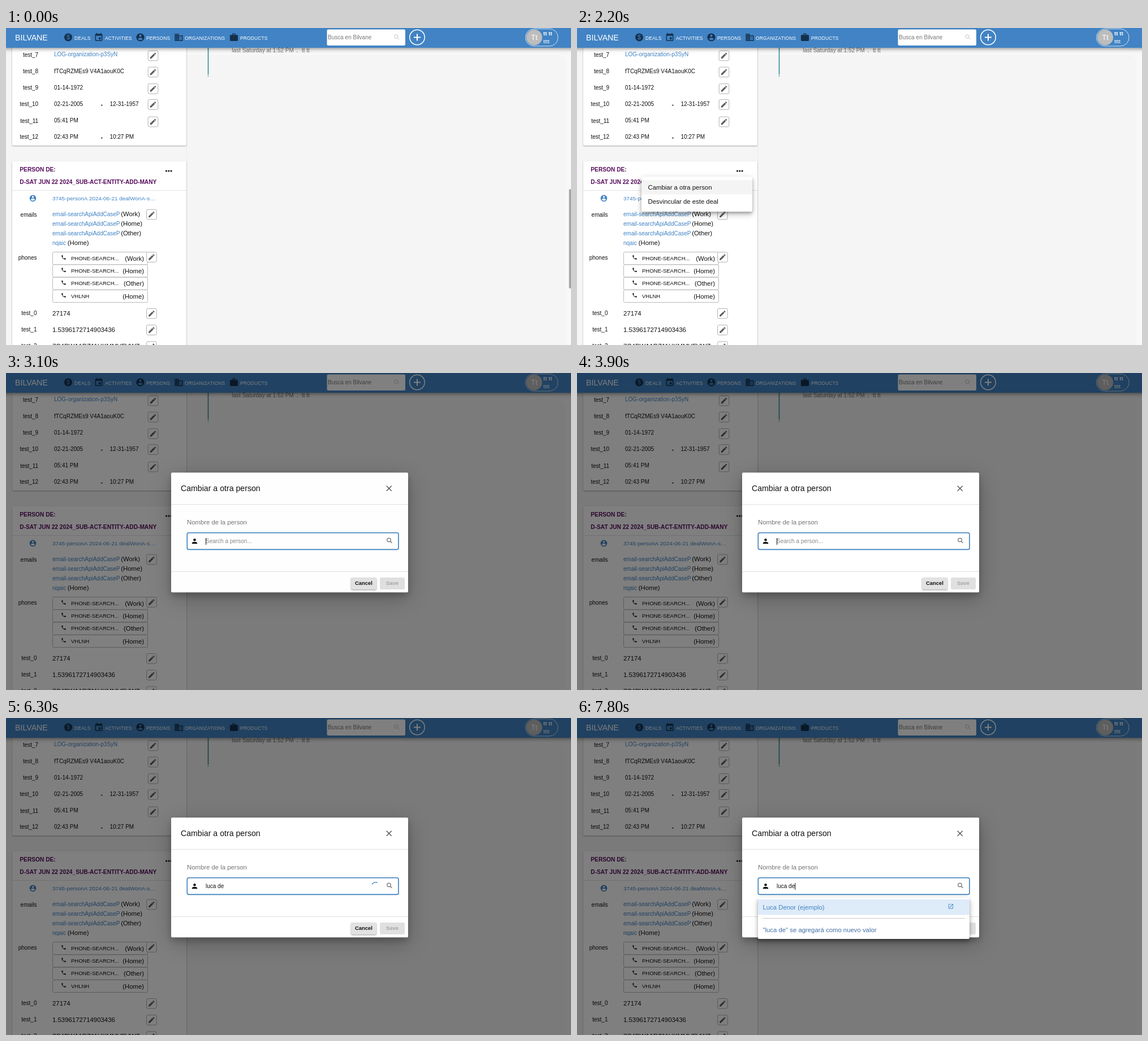
Animation, 999 px wide and 561 px high, one loop 8000 ms. Source, as an HTML page:

```html
<!DOCTYPE html>
<html lang="es">
<head>
<meta charset="utf-8">
<title>Cambiar a otra person</title>
<style>
html, body { margin: 0; width: 100%; height: 100%; overflow: hidden; background: #f5f5f5; }
svg { display: block; width: 100%; height: 100%; font-family: "Liberation Sans", Arial, sans-serif; }
text { white-space: pre; }
.card { filter: drop-shadow(0 1px 1px rgba(0,0,0,.32)); }
.bar { filter: drop-shadow(0 1px 2px rgba(0,0,0,.2)) drop-shadow(0 4px 2.5px rgba(0,0,0,.14)) drop-shadow(0 1px 5px rgba(0,0,0,.12)); }
.paper { filter: drop-shadow(0 3px 2px rgba(0,0,0,.2)) drop-shadow(0 5px 5px rgba(0,0,0,.14)) drop-shadow(0 2px 6px rgba(0,0,0,.12)); }
.sheet { filter: drop-shadow(0 6px 6px rgba(0,0,0,.2)) drop-shadow(0 9px 18px rgba(0,0,0,.24)); }
.button { filter: drop-shadow(0 1px 1px rgba(0,0,0,.4)); }
</style>
</head>
<body>
<svg id="stage" viewBox="0 0 999 561" preserveAspectRatio="none"></svg>
<script>
const BLUE = '#4183c4', INK = '#111', NAVY = '#14304c', PURPLE = '#560a5c';
const BRAND = 'Bilvane', USER = 'tt tt', PERSON = 'Luca Denor', QUERY = 'luca de';
const LOOP = 8000, FRAME = 100;

const ICONS = {
  pencil: 'M3 17.25V21h3.75L17.81 9.94l-3.75-3.75zM20.71 7.04c.39-.39.39-1.02 0-1.41l-2.34-2.34c-.39-.39-1.02-.39-1.41 0l-1.83 1.83 3.75 3.75z',
  account: 'M12 2a10 10 0 1 0 0 20 10 10 0 0 0 0-20zm0 3a3 3 0 1 1 0 6 3 3 0 0 1 0-6zm0 14.2c-2.5 0-4.7-1.3-6-3.2 0-2 4-3.1 6-3.1s6 1.1 6 3.1c-1.3 1.9-3.5 3.2-6 3.2z',
  event: 'M17 12h-5v5h5zM16 1v2H8V1H6v2H5a2 2 0 0 0-2 2v14a2 2 0 0 0 2 2h14a2 2 0 0 0 2-2V5a2 2 0 0 0-2-2h-1V1zm3 18H5V8h14z',
  work: 'M20 6h-4V4a2 2 0 0 0-2-2h-4a2 2 0 0 0-2 2v2H4a2 2 0 0 0-2 2v11a2 2 0 0 0 2 2h16a2 2 0 0 0 2-2V8a2 2 0 0 0-2-2zm-6 0h-4V4h4z',
  phone: 'M6.6 10.8c1.4 2.8 3.8 5.1 6.6 6.6l2.2-2.2c.3-.3.7-.4 1-.2 1.1.4 2.3.6 3.6.6a1 1 0 0 1 1 1V20a1 1 0 0 1-1 1A17 17 0 0 1 3 4a1 1 0 0 1 1-1h3.5a1 1 0 0 1 1 1c0 1.3.2 2.5.6 3.6.1.3 0 .7-.3 1z',
  person: 'M12 12a4 4 0 1 0 0-8 4 4 0 0 0 0 8zm0 2c-2.7 0-8 1.3-8 4v2h16v-2c0-2.7-5.3-4-8-4z',
  open: 'M19 19H5V5h7V3H5a2 2 0 0 0-2 2v14a2 2 0 0 0 2 2h14a2 2 0 0 0 2-2v-7h-2zM14 3v2h3.6l-9.8 9.8 1.4 1.4L19 6.4V10h2V3z'
};

const text = (x, y, s, size = 10, fill = INK, extra = '') =>
  `<text x="${x}" y="${y}" font-size="${size}" fill="${fill}" ${extra}>${s}</text>`;
const END = 'text-anchor="end"', MID = 'text-anchor="middle"', BOLD = 'font-weight="bold"';
const rect = (x, y, w, h, fill, extra = '') =>
  `<rect x="${x}" y="${y}" width="${w}" height="${h}" fill="${fill}" ${extra}/>`;
const line = (d, stroke, w = 1, extra = '') =>
  `<path d="${d}" fill="none" stroke="${stroke}" stroke-width="${w}" ${extra}/>`;
const circle = (x, y, r, fill, extra = '') =>
  `<circle cx="${x}" cy="${y}" r="${r}" fill="${fill}" ${extra}/>`;
const place = (cx, cy, size, body) =>
  `<g transform="translate(${cx - size / 2} ${cy - size / 2}) scale(${size / 24})">${body}</g>`;
const icon = (name, cx, cy, size, fill) =>
  place(cx, cy, size, `<path d="${ICONS[name]}" fill="${fill}" fill-rule="evenodd"/>`);
const lens = (cx, cy, color, w) =>
  circle(cx - 1, cy - 1, 3.2, 'none', `stroke="${color}" stroke-width="${w}"`) +
  line(`M${cx + 1.4} ${cy + 1.4}l3 3`, color, w);
const editButton = (cx, cy) =>
  rect(cx - 8.8, cy - 8.8, 17.6, 17.6, '#fff', 'rx="2.5" stroke="#b0b0b0"') + icon('pencil', cx, cy, 14, '#5c5c5c');

function building(cx, cy) {
  return place(cx, cy, 17,
    `<path d="M2 3h10v4h10v14H2z" fill="${NAVY}"/><path d="M12 9h8v10h-8z" fill="${BLUE}"/>` +
    line('M5 5v14M9 5v14', BLUE, 2, 'stroke-dasharray="2 2"') +
    line('M13 11v8M17 11v6', NAVY, 2, 'stroke-dasharray="2 2"'));
}

function header() {
  const items = [['DEALS', 121], ['ACTIVITIES', 175], ['PERSONS', 248], ['ORGANIZATIONS', 316], ['PRODUCTS', 414]];
  return rect(-20, -20, 1039, 55, BLUE, 'class="bar"') +
    text(16, 22, BRAND.toUpperCase(), 14.2, '#fff') +
    circle(110, 16.5, 7, NAVY) + text(110, 20.4, '$', 11, BLUE, MID) +
    icon('event', 164, 16.5, 17, NAVY) + icon('account', 237.5, 16.5, 17, NAVY) +
    building(305.5, 16.5) + icon('work', 403, 16.5, 17, NAVY) +
    items.map(([s, x]) => text(x, 20.5, s, 8.4, '#fff', 'letter-spacing=".2"')).join('') +
    rect(567.5, 2.5, 138.5, 28.5, '#fff', 'rx="2.5"') +
    text(569, 20.3, 'Busca en ' + BRAND, 10, '#777') + lens(691, 16, '#c4c4c4', 1) +
    circle(727, 16.5, 13.3, 'none', 'stroke="#fff" stroke-width="1.5"') +
    line('M721 16.5h12M727 10.5v12', '#fff', 2) +
    rect(918.5, 1.5, 57.5, 30.5, 'none', 'rx="15" stroke="#d5e3f1"') +
    circle(934, 16.7, 14, '#bdbdbd') + text(934, 21.3, 'Tt', 13, '#fff', MID) +
    text(950, 13.2, USER, 9.8, '#fff', BOLD) + text(950, 27, 'tttt', 9.8, '#fff');
}

function upperCard() {
  const rows = [
    [50.3, 'LOG-organization-p3SyN', '', 49], [79.5, 'fTCqRZMEs9 V4A1aouK0C', '', 78],
    [108.8, '01-14-1972', '', 107.5], [137.5, '02-21-2005', '12-31-1957', 135.5],
    [167.3, '05:41 PM', '', 166], [196.2, '02:43 PM', '10:27 PM', 0]];
  return rect(11, 0, 308, 208, '#fff', 'rx="2" class="card"') + rows.map(([y, a, b, edit], i) =>
    text(57.2, y + .2, 'test_' + (i + 7), 10, INK, END) + text(85, y, a, 10, i ? INK : BLUE) +
    (b && text(167.5, y + 1, '-', 11, INK, BOLD) + text(183.4, y, b)) +
    (edit ? editButton(260, edit) : '')).join('');
}

function lowerCard() {
  const kinds = ['(Work)', '(Home)', '(Other)', '(Home)'];
  const labels = [['emails', 334], ['phones', 409.7], ['test_0', 507.6], ['test_1', 536.8], ['test_2', 566]];
  const values = ['27174', '1.5396172714903436', '7C4BWA1RZ11HKMMVFVWZ'];
  return rect(11, 236, 308, 340, '#fff', 'rx="2" class="card"') +
    text(24.3, 254, 'PERSON DE:', 10.2, PURPLE, BOLD) +
    text(24.3, 276, 'D-SAT JUN 22 2024_SUB-ACT-ENTITY-ADD-MANY', 10.2, PURPLE, BOLD) +
    [283.5, 287.8, 292.1].map(x => circle(x, 253, 1.6, INK)).join('') +
    line('M11 287.5H319', '#e2e2e2') +
    icon('account', 47.5, 301.3, 14, BLUE) +
    text(82, 305.2, '3745-personA 2024-06-21 dealWonA-s…', 9.95, BLUE) +
    labels.map(([s, y]) => text(54.5, y, s, 10, INK, END)).join('') +
    kinds.map((kind, i) => {
      const y = 333.3 + i * 16.8, top = 396.5 + i * 22.35, last = i === 3;
      return text(82, y, last ? 'nqaic' : 'email-searchApiAddCaseP', 10, BLUE) +
        text(last ? 108.8 : 203.2, y, kind, 11.35) +
        rect(82.5, top, 168, 22, '#fff', 'rx="2" stroke="#b8b8b8"') +
        icon('phone', 102, top + 9.5, 10, INK) +
        text(115, top + 14.2, last ? 'VHLNH' : 'PHONE-SEARCH...', 9.5) +
        text(244, top + 15, kind, 11.35, INK, END);
    }).join('') +
    values.map((s, i) => text(82, 508.7 + i * 29.2, s, 11.4)).join('') +
    [330, 405.5, 505.3, 534.5, 563.7].map(y => editButton(257.4, y)).join('');
}

function page() {
  return rect(0, 0, 999, 561, '#f5f5f5') + rect(320, 35, 679, 526, '#f8f8f8') +
    `<path d="M320 48H977a12 12 0 0 1 12 12V561H320z" fill="#f5f5f5"/>` +
    line('M319.5 35V561', '#ececec') +
    line('M357.5 35V82.5', '#2f8d98', 1.6) + circle(357.5, 85, .9, '#2f8d98') +
    text(399.3, 43, 'last Saturday at 1:52 PM', 10, '#777') +
    text(513.5, 43, '.', 11, '#555') + text(523, 43, USER, 10, '#777') +
    upperCard() + lowerCard() + header() +
    rect(995.5, 285, 3.5, 176, '#a3a3a3', 'rx="1.7" id="scrollbar"');
}

function menu() {
  return rect(114, 263, 196, 62, '#fff', 'rx="2" class="paper"') + rect(114, 269, 196, 25.5, '#f4f4f4') +
    text(125.6, 286, 'Cambiar a otra person', 11.35) + text(125.6, 311, 'Desvincular de este deal', 11.35);
}

function dialog() {
  return rect(292, 176.3, 419, 212, '#fff', 'rx="2" class="sheet"') +
    text(309, 209, 'Cambiar a otra person', 14.15) +
    line('M672.7 199.7l9 9m0-9l-9 9', '#555', 1.4) +
    line('M292 232.5H711M292 351.5H711', '#e0e0e0') +
    text(320, 267.5, 'Nombre de la person', 11.35, '#757575') +
    rect(320.3, 282.8, 373.7, 29.6, '#fff', 'rx="3" stroke="#3a7ebd" stroke-width="1.6"') +
    icon('person', 333.5, 297.6, 14, INK) + lens(678, 296.5, '#555', 1.1) +
    rect(610, 362, 45, 21, '#e2e2e2', 'rx="2.5" class="button"') +
    text(632.4, 375.2, 'Cancel', 9.45, INK, `${BOLD} ${MID}`) +
    rect(661, 362, 44, 21, '#e0e0e0', 'rx="2.5"') +
    text(683, 375.2, 'Save', 9.45, '#a6a6a6', `${BOLD} ${MID}`) +
    text(353, 301.2, '', 10, INK, 'id="query"') +
    rect(353, 292, 1, 12, INK, 'id="caret"') +
    `<g id="spinner">${circle(0, 0, 20.2, 'none', 'id="arc" stroke="#3a7ebd" stroke-width="3.6"')}</g>`;
}

function results() {
  return rect(320, 318, 374, 73, '#fff', 'rx="2" class="paper"') + rect(320, 321, 374, 27.5, '#deebf9') +
    text(328.5, 338.8, PERSON + ' (ejemplo)', 11.35, BLUE) + icon('open', 661, 333.3, 11, BLUE) +
    line('M328.5 354.5H686', '#c9c9c9') +
    text(328.5, 378.5, `"${QUERY}" se agregará como nuevo valor`, 11.35, '#426fa8');
}

const group = (id, body) => `<g id="${id}">${body}</g>`;
document.getElementById('stage').innerHTML = page() + group('menu', menu()) +
  rect(0, 0, 999, 561, '#000', 'id="backdrop"') + group('dialog', dialog()) + group('results', results());

const ids = ['scrollbar', 'menu', 'backdrop', 'dialog', 'results', 'query', 'caret', 'spinner', 'arc'];
const parts = Object.fromEntries(ids.map(id => [id, document.getElementById(id)]));
const set = (node, attrs) => { for (const k in attrs) node.setAttribute(k, attrs[k]); };
const show = (node, on) => { node.style.display = on ? '' : 'none'; };
const clamp = v => Math.min(1, Math.max(0, v));

// Cubic Bézier easing, solved by bisection.
function ease(x, x1 = .4, y1 = 0, x2 = .2, y2 = 1) {
  const at = (u, a, b) => 3 * u * (1 - u) ** 2 * a + 3 * u * u * (1 - u) * b + u ** 3;
  x = clamp(x);
  let lo = 0, hi = 1;
  for (let i = 0; i < 24; i++) {
    const mid = (lo + hi) / 2;
    if (at(mid, x1, x2) < x) lo = mid; else hi = mid;
  }
  return at(hi, y1, y2);
}

function drawMenu(t) {
  const closing = t >= 2900;
  const alpha = closing ? 1 - ease((t - 2890) / 190) : ease((t - 1480) / 270);
  const s = closing ? 1 - .25 * ease((t - 2975) / 125) : .75 + .25 * ease((t - 1480) / 180);
  show(parts.menu, alpha > .005);
  set(parts.menu, { opacity: alpha, transform: `translate(310 263) scale(${s} ${s * s}) translate(-310 -263)` });
}

function drawDialog(t) {
  const fade = ease((t - 2896) / 225);
  set(parts.backdrop, { opacity: fade / 2 });
  set(parts.dialog, { opacity: fade });
  show(parts.dialog, fade > 0);
  show(parts.results, t >= 6900);
}

function drawSpinner(t) {
  const on = t >= 5200 && t < 6900;
  show(parts.spinner, on);
  if (!on) return;
  const p = (t - 5150) / 1400 % 1;
  const grow = ease(p * 2, .42, 0, .58, 1), slide = ease(p * 2 - 1, .42, 0, .58, 1);
  set(parts.spinner, { transform: `translate(653.5 298) rotate(${360 * p}) scale(${16 / 44})` });
  set(parts.arc, { 'stroke-dasharray': `${1 + 99 * grow} 200`, 'stroke-dashoffset': -(15 * grow + 110 * slide) });
}

function drawInput(t) {
  const typed = t < 5100 ? 0 : Math.min(QUERY.length, 1 + Math.floor((t - 5100) / 116));
  const value = QUERY.slice(0, typed);
  parts.query.textContent = value || 'Search a person...';
  set(parts.query, { fill: value ? INK : '#8a8a8a' });
  const typing = t >= 5100 && t < 5800;
  const since = t < 5100 ? t - 2900 : t - 5800;
  show(parts.caret, typing || Math.floor(since / 500) % 2 === 0);
  set(parts.caret, { x: 353 + (value ? parts.query.getComputedTextLength() : 0) });
}

function draw(time) {
  const t = Math.floor(time % LOOP / FRAME) * FRAME;
  show(parts.scrollbar, t < 1500);
  drawMenu(t);
  drawDialog(t);
  drawInput(t);
  drawSpinner(t);
}

const start = performance.now();
function tick() {
  draw(performance.now() - start);
  requestAnimationFrame(tick);
}
tick();
</script>
</body>
</html>
```
